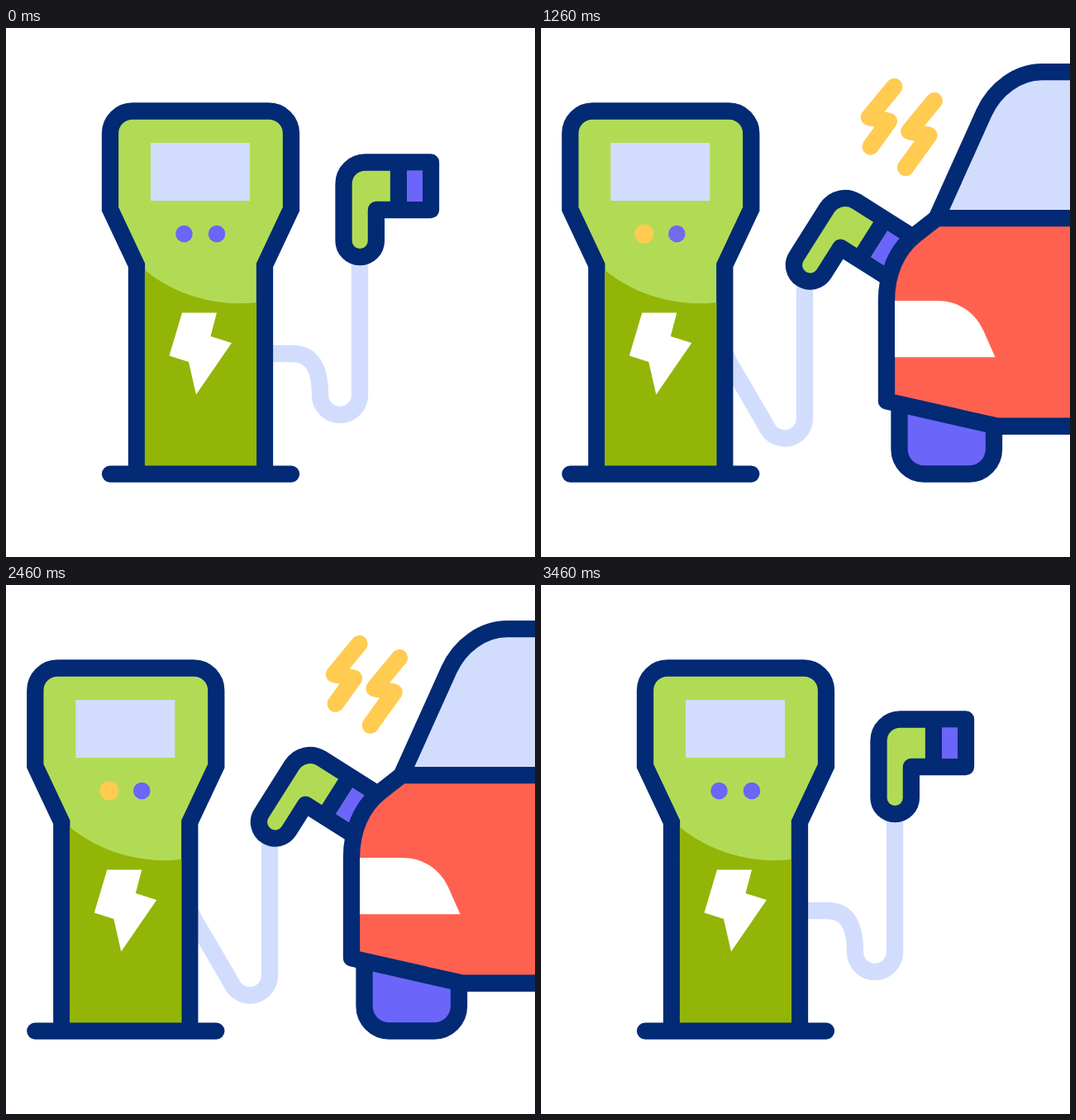
Animation of 640 by 640 pixels, one loop 3.6 s. Source, as an HTML page:

```html
<!DOCTYPE html>
<html lang="en">
<head>
<meta charset="utf-8">
<title>Car charging</title>
<style>
  html, body { margin: 0; width: 100%; height: 100%; overflow: hidden; background: #fff; }
  svg { display: block; width: 100vw; height: 100vh; fill: none; stroke-width: 20.3; }
  .line { stroke: #022a75; }
  .round { stroke-linejoin: round; stroke-linecap: round; }
  .purple { fill: #6b65fa; }
  .pale { fill: #d2ddfd; }
  .lime { fill: #b2db55; }
  .red { fill: #ff6150; }
  .white { fill: #fff; }
  .lit { fill: #ffcb51; }
</style>
</head>
<body>
<svg viewBox="0 0 640 640">
  <g id="station">
    <path id="cable" stroke="#d2ddfd"/>
    <path class="line lime" d="M158 539V287L126 219V127.500a27 27 0 0 1 27-27H318a27 27 0 0 1 27 27V219L313 287V539"/>
    <path fill="#92b508" d="M167.900 293A182 182 0 0 0 303.100 332V539H167.900Z"/>
    <path class="line round" d="M126 539.600H345"/>
    <path class="pale" d="M175 139H295V209H175Z"/>
    <circle class="purple" cx="215.500" cy="249" r="10.300"/>
    <circle class="purple" cx="255" cy="249" r="10.300"/>
    <circle id="light1" class="lit" cx="215.500" cy="249" r="11.500"/>
    <circle id="light2" class="lit" cx="255" cy="249" r="11.500"/>
    <path class="white" d="M213 344.500H255L247.500 373L273 381L230 443.500L221 404L197.500 396.500Z"/>
    <g id="plug">
      <path class="line round lime" d="M514 162.500H434.500a26 26 0 0 0-26 26V257.500a19.700 19.700 0 0 0 39.400 0V220H514Z"/>
      <path class="line" d="M475 162.500V220"/>
      <path class="purple" d="M485 172.500H504V209.900H485Z"/>
    </g>
  </g>
  <g stroke="#ffcb51" class="round">
    <path id="bolt1" pathLength="1"/>
    <path id="bolt2" pathLength="1"/>
  </g>
  <g id="car">
    <path class="line purple" d="M433.500 420V509.500a30 30 0 0 0 30 30H518a30 30 0 0 0 30-30V420"/>
    <g id="body">
      <path class="line round pale" d="M960 42.700H606C577 42.700 549 63 536 92L478.500 219.700H960"/>
      <path class="line round red" d="M960 219.700H478.500L452 240.500C430 258 418 287 418 319V441L552 471.300H960"/>
      <path class="white" d="M428 319.500H480C505 319.500 525 334 535 355L549.500 387.700H428Z"/>
    </g>
  </g>
</svg>
<script>
const LOOP = 3600, ARRIVED = 580, HALF_BOB = 600, LEAVING = 2960, GONE = 3460;
const SHIFT = 90.7, CAR_TRAVEL = 242, BOB = 11, SAG_RADIUS = 24;

const set = (id, name, value) => document.getElementById(id).setAttribute(name, value);
const mix = (a, b, k) => a + (b - a) * k;
const ease = (t, from, to) => {
  const s = Math.min(1, Math.max(0, (t - from) / (to - from)));
  return s * s * (3 - 2 * s);
};
// Point at a distance from (x, y); the angle is in degrees from straight down
const step = (x, y, angle, distance) => {
  const a = angle * Math.PI / 180;
  return [x + distance * Math.sin(a), y + distance * Math.cos(a)];
};

// A bend out of the station, then a round sag, then straight up to the plug
function drawCable(connected, low) {
  const pose = (hanging, high, bottom) => mix(hanging, mix(high, bottom, low), connected);
  const bend = [pose(346, 319, 319), pose(394, 402, 406)];
  const sag = [pose(404, 385.7, 385.7), pose(444, 463, 473)];
  const entry = pose(90, 40, 30), lean = pose(0, 25, 30);
  const touch = step(...sag, lean - 90, SAG_RADIUS);
  set('cable', 'd', `M313 394L${bend}C${step(...bend, entry, 21)} ${step(...touch, lean, -37)} ${touch}` +
    `A${SAG_RADIUS} ${SAG_RADIUS} 0 0 0 ${sag[0] + SAG_RADIUS} ${sag[1]}V260`);
}

function drawBolt(id, x, y, foot, start, end, t, squeeze) {
  const head = ease(t, start, start + 280), tail = ease(t, end, end + 280);
  const tip = mix(foot, 27, squeeze);
  set(id, 'd', `M${x - 2.5 * squeeze} ${y}l-30.5 37l24 4.7l${-0.72 * tip} ${tip}`);
  set(id, 'stroke-dasharray', `${head - tail} 3`);
  set(id, 'stroke-dashoffset', -tail);
  set(id, 'visibility', head - tail > 0.001 ? 'visible' : 'hidden');
}

function draw(t) {
  const connected = ease(t, 0, ARRIVED) - ease(t, LEAVING, GONE);
  const turn = n => ease(t, ARRIVED + n * HALF_BOB, ARRIVED + (n + 1) * HALF_BOB);
  const low = turn(0) - turn(1) + turn(2) - turn(3);
  const middle = turn(1) - turn(2);
  const drop = BOB * low;

  set('station', 'transform', `translate(${-SHIFT * connected})`);
  set('car', 'transform', `translate(${CAR_TRAVEL * (1 - connected)})`);
  set('body', 'transform', `translate(0 ${drop})`);
  set('plug', 'transform', `translate(${-11.8 * connected} ${18.8 * connected + drop})` +
    `rotate(${32.3 * connected} 428 257.5)`);
  drawCable(connected, low);
  set('light1', 'opacity', Math.min(1, 1.1 * low));
  set('light2', 'opacity', Math.min(1, 1.1 * middle));
  drawBolt('bolt1', 427.5, 71, 31, 560, 2620, t, middle);
  drawBolt('bolt2', 476, 88, 40, 460, 2700, t, middle);
}

function tick() {
  draw(performance.now() % LOOP);
  requestAnimationFrame(tick);
}
tick();
</script>
</body>
</html>
```
